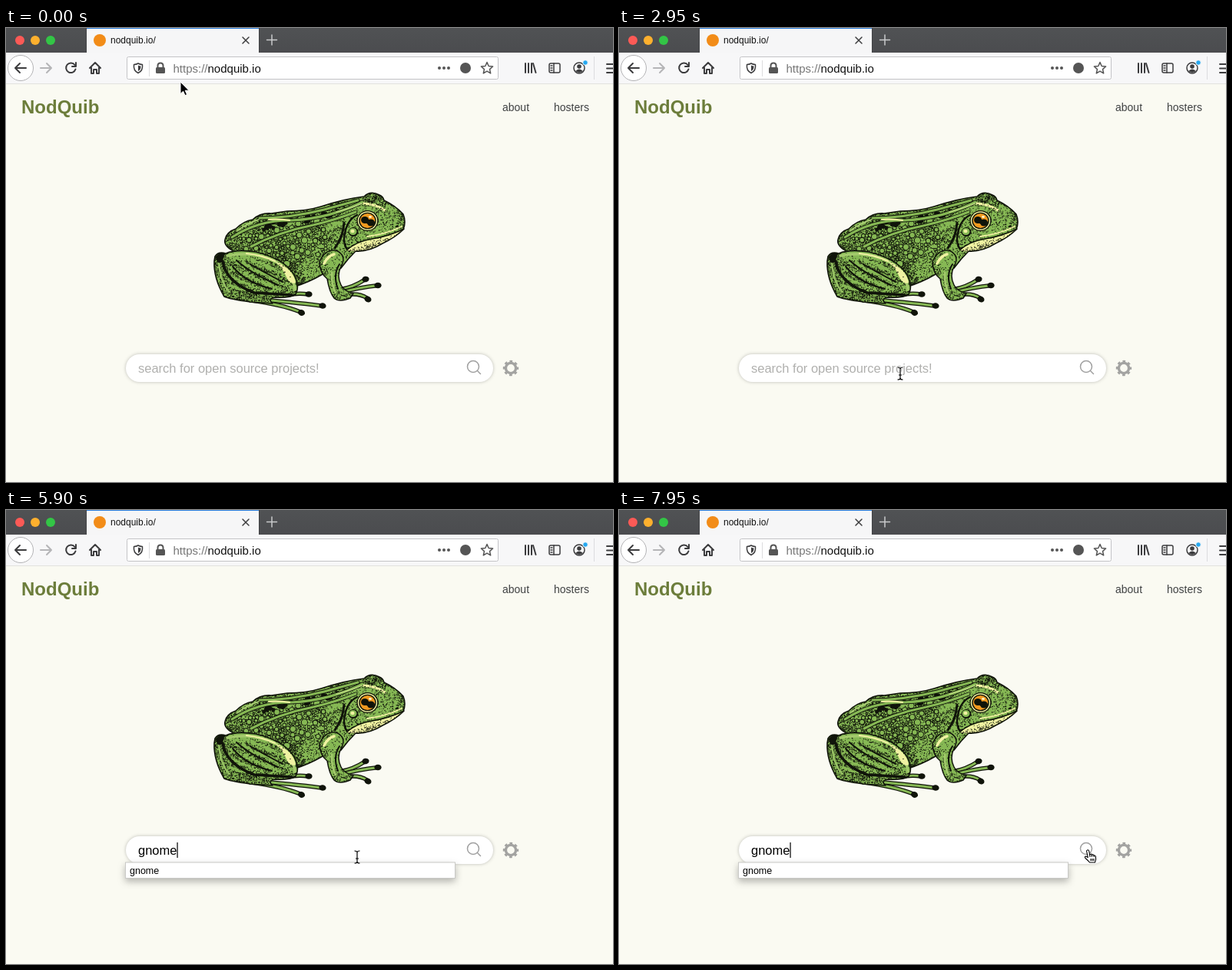
Animation of 790 by 590 pixels, one loop 8000 ms. Source, as an HTML page with a canvas:

```html
<!DOCTYPE html>
<html lang="en">
<head>
<meta charset="utf-8">
<title>Search</title>
<style>
  html, body { margin: 0; width: 100%; height: 100%; overflow: hidden; background: #fafaf2; }
  svg, canvas { position: absolute; left: 0; top: 0; }
  text { font-family: "Liberation Sans", Arial, sans-serif; white-space: pre; }
  .line { fill: none; stroke: #3c3c3e; stroke-width: 2; stroke-linecap: round; stroke-linejoin: round; }
  .thin { stroke-width: 1.5; }
  .pill { fill: #fff; filter: drop-shadow(0 0 2px rgba(0,0,0,.25)); }
  .list { filter: drop-shadow(0 4px 5px rgba(0,0,0,.28)); }
</style>
</head>
<body>
<svg width="790" height="590" viewBox="0 0 790 590">
  <defs>
    <linearGradient id="bar" x2="0" y2="1">
      <stop stop-color="#505254"/><stop offset="1" stop-color="#4b4c4f"/>
    </linearGradient>
  </defs>
  <rect width="790" height="590" fill="#fafaf2"/>

  <g id="tabs">
    <rect width="790" height="32" fill="url(#bar)"/>
    <rect x="104" width="226" height="32" fill="#424346"/>
    <rect x="105" width="224" height="32" fill="#f6f6f7"/>
    <rect x="105" width="224" height="1" fill="#2a7fe0"/>
    <circle cx="18" cy="16" r="6" fill="#fc5a56"/>
    <circle cx="38" cy="16" r="6" fill="#fdb02e"/>
    <circle cx="58" cy="16" r="6" fill="#33c546"/>
    <circle cx="122" cy="16" r="8" fill="#f28c18"/>
    <text x="136" y="20" font-size="12" fill="#111">nodquib.io/</text>
    <path class="line thin" d="M308 12l8 8m0-8l-8 8"/>
    <path class="line thin" style="stroke:#c9cacc" d="M339.500 15.500h13m-6.500-6.500v13"/>
  </g>

  <g id="toolbar">
    <rect y="32" width="790" height="40" fill="#f7f7f8"/>
    <rect y="72" width="790" height="1" fill="#e2e2de"/>
    <circle cx="19" cy="52" r="16.500" fill="#fff" stroke="#b3b3b5"/>
    <path class="line" d="M26 52H12m6-6l-6 6 6 6"/>
    <path class="line" style="stroke:#b5b5b7" d="M45 52h14m-6-6l6 6-6 6"/>
    <path class="line" d="M89.500 48a6.300 6.300 0 1 0 1 5.500M91 45v5h-5"/>
    <path class="line" d="M109 52l7-7 7 7M111 51v8h3v-5h4v5h3v-8"/>
    <rect x="157.500" y="37.500" width="483" height="29" rx="2" fill="#fff" stroke="#c3c3c6"/>
    <path class="line thin" d="M166.500 47.500q3 0 5.500-1.500 2.500 1.500 5.500 1.500 1 8-5.500 11-6.500-3-5.500-11z"/>
    <path d="M172 48.500q1.500 1 3.500 1 0 5-3.500 6.500z" fill="#3c3c3e"/>
    <path d="M186.500 42v21M765.500 37v30" stroke="#dcdcde"/>
    <rect x="195" y="51" width="12" height="8" rx="1.500" fill="#555"/>
    <path class="line" style="stroke:#555" d="M197.500 52v-3q0-3.500 3.500-3.500t3.500 3.500v3"/>
    <text x="217.500" y="58" font-size="15" fill="#777">https://<tspan fill="#111">nodquib.io</tspan></text>
    <g fill="#555"><circle cx="564" cy="52" r="2"/><circle cx="570" cy="52" r="2"/><circle cx="576" cy="52" r="2"/>
      <circle cx="598" cy="52" r="7"/></g>
    <path class="line thin" id="star" style="stroke:#555"/>
    <path class="line" d="M676 46v12M680 46v12M684 46v12M686 46l3.500 12"/>
    <rect class="line thin" x="707" y="46" width="14" height="12" rx="2"/>
    <path class="line thin" d="M713 46v12M709 49h2M709 52h2M709 55h2"/>
    <circle class="line thin" cx="746" cy="52" r="7"/>
    <circle cx="746" cy="50" r="2.800" fill="#3c3c3e"/>
    <path d="M741 56q5-5 10 0-5 4-10 0z" fill="#3c3c3e"/>
    <circle cx="754" cy="45" r="3.300" fill="#25a8f0" stroke="#f7f7f8"/>
    <path class="line" d="M782 47h14M782 52.500h14M782 58h14"/>
  </g>

  <text x="20" y="111" font-size="24" font-weight="700" fill="#6c7d3b">NodQuib</text>
  <g font-size="14" fill="#3f4142"><text x="646" y="108">about</text><text x="713" y="108">hosters</text></g>

  <rect class="pill" x="156" y="424" width="478" height="36" rx="18"/>
  <text id="query" x="172" y="448" font-size="16.500"></text>
  <rect id="caret" y="432" width="1.200" height="20" fill="#000"/>
  <path class="line thin" style="stroke:#a0a0a0" d="M613.500 445.500l4 4M615.500 440a7.500 7.500 0 1 0-15 0a7.500 7.500 0 1 0 15 0"/>
  <g fill="none" stroke="#a3a3a1">
    <circle cx="657" cy="442" r="6.600" stroke-width="3.400"/>
    <circle cx="657" cy="442" r="8.800" stroke-width="2.800" stroke-dasharray="3.600 3.312" stroke-dashoffset="1.800"/>
  </g>
  <g id="list">
    <rect class="list" x="155.500" y="458" width="429" height="20.500" fill="#fff" stroke="#c9c9c6"/>
    <text x="161" y="473" font-size="12.500">gnome</text>
  </g>
</svg>

<canvas id="frog" width="790" height="590"></canvas>

<svg width="790" height="590" viewBox="0 0 790 590">
  <g id="pointer">
    <path id="arrow" d="M0 0V15.500L3.600 12.200 6 17.600 8.600 16.500 6.200 11.200H11Z" stroke="#fff"/>
    <g id="beam" fill="none">
      <path d="M-3.500-8Q0-8 0-6Q0-8 3.500-8M0-6V6M-3.500 8Q0 8 0 6Q0 8 3.500 8M-2 2H2" stroke="#fff" stroke-width="2.600"/>
      <path d="M-3.500-8Q0-8 0-6Q0-8 3.500-8M0-6V6M-3.500 8Q0 8 0 6Q0 8 3.500 8M-2 2H2" stroke="#000" stroke-width="1.200"/>
    </g>
    <g id="hand" stroke="#000" stroke-width="1.100" stroke-linejoin="round">
      <path fill="#fff" d="M-1.500 1Q0-1.500 1.700 1L2.600 6Q4 5 5.200 6.200 7 5.400 8 7 10 6.500 10.400 8.500 11.300 12 9.500 16H2.500Q0 13-3 10.500-4.500 8.500-2.500 8L.3 9.600Z"/>
      <path fill="none" d="M4 11v3M6 11v3M8 11v3M2.600 6l.5 3M5.200 6.200l.3 2.500M8 7l.2 2"/>
    </g>
  </g>
</svg>

<script>
const $ = id => document.getElementById(id);

$("star").setAttribute("d", "M" + Array.from({ length: 10 }, (_, i) => {
  const r = i % 2 ? 3.7 : 8, a = i * Math.PI / 5 - Math.PI / 2;
  return [626 + r * Math.cos(a), 52.5 + r * Math.sin(a)].join(" ");
}).join("L") + "Z");

function drawFrog() {
  const g = $("frog").getContext("2d");
  const green = "#86b854", ink = "#10140a", pale = "#f0f2a2";
  let seed = 7;
  const rand = () => (seed = seed * 16807 % 2147483647) / 2147483647;
  const stroke = (d, color, width) => {
    g.strokeStyle = color;
    g.lineWidth = width;
    g.stroke(new Path2D(d));
  };
  const fill = (d, color) => { g.fillStyle = color; g.fill(new Path2D(d)); };
  const oval = (x, y, rx, ry, color, turn = 0) => {
    g.fillStyle = color;
    g.beginPath();
    g.ellipse(x, y, rx, ry, turn, 0, 7);
    g.fill();
  };
  const inside = (d, paint) => {
    g.save();
    g.clip(new Path2D(d));
    paint();
    g.restore();
  };
  const stipple = (x, y, w, h, count, shade) => {
    for (let i = 0; i < count; i++) {
      const px = x + w * rand(), py = y + h * rand();
      if (rand() < shade(px, py)) oval(px, py, .4 + .5 * rand(), .4 + .4 * rand(), ink);
    }
  };
  // Round warts that keep clear of each other, so the dark bed shows between them.
  const warts = (count, place) => {
    const placed = [];
    for (let i = 0; i < count; i++) {
      const [x, y] = place(), r = 1 + 3 * rand() ** 2;
      if (placed.some(w => Math.hypot(w.x - x, w.y - y) < w.r + r + 1)) continue;
      placed.push({ x, y, r });
      oval(x, y, r + .9, r + .9, ink);
      oval(x, y, r, r, green);
    }
  };
  const toe = (d, x, y, turn) => {
    stroke(d, ink, 5.4);
    stroke(d, green, 2.8);
    oval(x, y, 4.6, 3.8, ink, turn);
  };
  g.lineCap = g.lineJoin = "round";

  const body = "M296 290Q283 283 285 275Q287 265 299 261Q309 251 321 249Q331 240 345 241L366 238Q391 238 410 232Q440 222 466 219Q474 211 486 217Q491 219 492 224Q507 231 517 242Q521 252 517 262Q507 272 490 280Q472 291 455 290Q445 300 436 312L412 320Q395 330 376 336L330 330Z";
  const thigh = "M272 297Q276 290 286 293Q300 287 325 291Q360 299 374 319Q383 335 377 346Q370 351 350 350Q340 352 347 358L318 356Q290 352 284 349Q270 325 271 303Z";
  const arm = "M408 304Q415 287 430 289Q444 296 436 310Q430 322 436 334Q440 342 452 345L448 351Q434 357 427 351Q421 344 418 326Q408 318 408 304Z";
  const jaw = "M517 262Q497 272 476 275Q456 278 444 289Q454 292 466 289Q480 286 490 280Q507 272 517 262Z";

  toe("M366 347Q380 344 393 346", 394, 346, 0);
  fill(body, green);
  inside(body, () => {
    const flank = (x, y) => y > 290 - (x - 310) * .2;
    stipple(280, 210, 245, 128, 27000, (x, y) => {
      if (x > 440 && y > 232) return .1 + (y > 255 && x < 475 ? .12 : 0);
      if (x > 390 && y > 278) return .22;
      const patch = Math.sin(x * .16 + 2 * Math.sin(y * .17)) * Math.sin(y * .24 + x * .05);
      return .4 + .35 * patch + (x < 330 ? .15 : 0) + (flank(x, y) ? .18 : 0);
    });
    warts(420, () => {
      const x = 312 + 104 * rand();
      return [x, 318 - (x - 312) * .2 - 46 * rand()];
    });
    warts(60, () => {
      const x = 292 + 130 * rand();
      return [x, 276 - (x - 292) * .25 + 7 * rand()];
    });
    for (let i = 0; i < 24; i++) {
      const x = 320 + 130 * rand();
      oval(x, 258 - (x - 320) * .2 + 8 * rand(), 2 + 3 * rand(), 1.5 + 1.5 * rand(), ink, -.2);
    }
    const ridges = ["M294 272Q330 249 372 250Q424 247 466 225", "M319 284Q355 265 400 256Q430 249 455 239", "M330 247Q370 247 414 236L458 224"];
    for (const d of ridges) {
      stroke(d, ink, 5);
      stroke(d, green, 3.2);
    }
    stroke("M342 249Q356 248 369 250", pale, 2.2);
    stroke("M430 239Q450 234 463 228", "#b8d67e", 1.5);
    stroke("M466 228Q482 229 493 237", pale, 3);
    stroke("M300 264Q315 253 329 249", "#b0d27a", 1.5);
    stroke("M457 243Q442 250 440 274Q440 286 447 290", ink, 2.4);
    stroke("M428 286Q439 271 440 253", ink, 3);
    stipple(464, 212, 56, 50, 1500, (x, y) => x > 508 || y < 226 ? .55 : .18);
  });
  fill(jaw, pale);
  inside(jaw, () => stipple(444, 262, 74, 30, 1200, (x, y) => y > 290 - (x - 444) * .34 ? .6 : .14));
  stroke("M518 261Q497 271 476 274Q457 277 444 288", ink, 1.6);
  stroke("M515 258Q494 268 470 271", pale, 1.8);
  stroke(body, ink, 1.6);

  oval(452, 265, 6.5, 6, ink);
  oval(451.5, 264.5, 5, 4.5, green);
  oval(451, 264, 2.6, 2.2, pale);
  oval(470.5, 250.5, 14, 13.5, ink);
  oval(470.5, 250.5, 12.7, 12.2, pale);
  oval(470.5, 250.5, 11.2, 10.8, ink);
  oval(470.5, 250.5, 9.8, 9.5, "#f19a20");
  oval(467, 249.5, 5, 4.6, ink);
  oval(475, 253, 5, 4.6, ink);
  oval(471, 251.5, 6, 3, ink, .4);
  oval(474, 245.5, 2, 1.4, "#fff4c8");

  toe("M318 354Q358 359 383 369", 384.5, 370, .3);
  toe("M320 352Q373 356 410 361", 412, 361, .1);
  fill(thigh, green);
  inside(thigh, () => {
    stipple(268, 287, 115, 75, 9000, (x, y) => {
      const hatch = .25 * Math.sin((y - x * .45) * .55);
      return x < 290 || y > 341 ? .5 : y < 302 - (x - 320) * .05 ? .1 : .27 + hatch;
    });
    stroke("M282 303Q286 330 323 344L372 347", ink, 3.5);
    stroke("M300 302Q319 319 354 334M295 310Q312 331 346 339M318 307Q337 318 360 330", ink, 2);
    stroke("M288 296Q325 289 352 304Q374 319 376 340", "#a3ca6c", 3.5);
    stroke("M277 306Q279 329 290 343", "#96c063", 2.5);
    fill("M350 303Q374 313 377 331Q372 334 366 326Q361 312 350 303Z", pale);
    stroke("M313 293Q332 295 350 303", pale, 2.2);
    stipple(352, 303, 25, 32, 90, () => .25);
  });
  fill("M273 298Q277 290 285 293L281 304Q275 308 273 298Z", ink);
  stroke(thigh, ink, 1.6);

  toe("M434 340Q452 337 467 327", 468, 326.5, -.2);
  toe("M434 344Q460 337 485 334.500", 484, 334.5, 0);
  toe("M434 349Q456 342 470 351", 471, 352.5, .4);
  fill(arm, green);
  inside(arm, () => {
    stipple(405, 286, 50, 71, 2600, (x, y) => x < 419 || y > 343 ? .45 : .16);
    stroke("M434 307Q425 321 432 339", ink, 2);
    stroke("M414 306Q419 296 427 294", pale, 3.5);
    stroke("M424 318Q423 332 429 344", "#a3ca6c", 2.5);
  });
  stroke(arm, ink, 1.5);
}
drawFrog();

const loop = 8000, word = "gnome";
const clickAt = 3000, firstKey = 3300, keyGap = 230, reappear = 5450, blink = 567;
const ease = {
  both: k => k * k * (3 - 2 * k),
  start: k => k * k * (2 - k),
  even: k => k,
  end: k => k * (2 - k)
};
const route = [
  [0, 227, 70], [200, 227, 70], [1550, 372, 403, "both"], [1750, 372, 403],
  [2300, 366, 449, "both"], [reappear, 366, 449], [5900, 457, 451, "start"],
  [6300, 530, 474, "even"], [6850, 609, 441, "end"], [7300, 609, 441], [7700, 610, 442, "both"], [loop, 610, 442]
];

function pointerAt(t) {
  const i = route.findIndex(stop => stop[0] > t);
  const [t0, x0, y0] = route[i - 1], [t1, x1, y1, kind = "even"] = route[i];
  const k = ease[kind]((t - t0) / (t1 - t0));
  return [x0 + (x1 - x0) * k, y0 + (y1 - y0) * k];
}

const show = (id, on) => $(id).setAttribute("visibility", on ? "inherit" : "hidden");

function render(t) {
  const typed = Math.max(0, Math.min(word.length, Math.floor((t - firstKey) / keyGap) + 1));
  const query = $("query");
  query.textContent = typed ? word.slice(0, typed) : "search for open source projects!";
  query.setAttribute("fill", typed ? "#000" : "#b0b0ae");
  $("caret").setAttribute("x", 172 + (typed ? query.getComputedTextLength() : 0));
  const lastKey = typed ? firstKey + (typed - 1) * keyGap : clickAt;
  show("caret", t >= clickAt && Math.floor((t - lastKey) / blink) % 2 === 0);
  show("list", typed > 0);

  const [x, y] = pointerAt(t);
  const overIcon = x > 597 && y > 424 && y < 460;
  const overList = typed > 0 && y > 458;
  const overField = y > 424 && y < 460 && !overIcon && !overList;
  $("pointer").setAttribute("transform", `translate(${x} ${y})`);
  show("pointer", t < firstKey || t >= reappear);
  show("hand", overIcon);
  show("beam", overField);
  show("arrow", !overIcon && !overField);
}

const begin = performance.now();
function tick() {
  const t = (performance.now() - begin) % loop;
  render(Math.floor(t / 50) * 50);
  requestAnimationFrame(tick);
}
tick();
</script>
</body>
</html>
```
